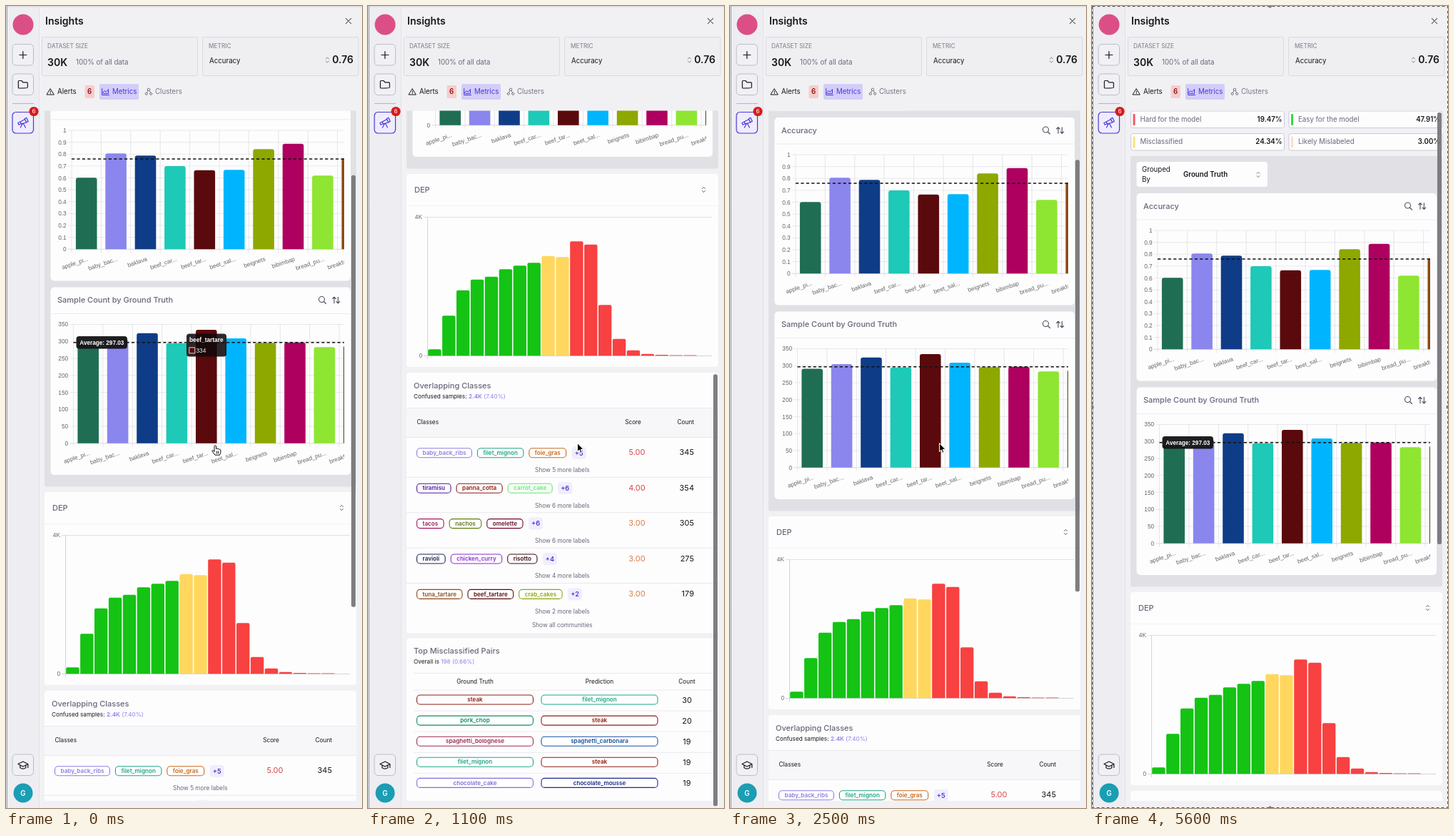
Animation, 499 px wide and 1122 px high, one loop 5.7 s. Source, as an HTML page with a canvas:

```html
<!DOCTYPE html>
<html lang="en">
<head>
<meta charset="utf-8">
<title>Insights</title>
<style>
html, body { margin: 0; width: 100%; height: 100%; overflow: hidden; background: #f1f1f4; }
canvas { display: block; width: 499px; height: 1122px; }
</style>
</head>
<body>
<canvas id="stage"></canvas>
<script>
const W = 499, H = 1122, LOOP = 5700, STEP = 100;
const canvas = document.getElementById('stage');
const c = canvas.getContext('2d');
const ratio = window.devicePixelRatio || 1;
canvas.width = W * ratio;
canvas.height = H * ratio;

const INTER = 'Inter, sans-serif';
const ARIAL = '"Liberation Sans", Arial, sans-serif';
const INK = '#17171c', MUTED = '#69677a', VIOLET = '#4b37d6', LILAC = '#8d80e6';

// ---------- helpers ----------
function text(s, x, y, size = 9.7, color = INK, weight = 400, align = 'left', family = INTER) {
  c.font = `${weight} ${size}px ${family}`;
  c.fillStyle = color;
  c.textAlign = align;
  c.fillText(s, x, y + size * 0.36);
}

function box(x, y, w, h, r, fill, stroke, lw = 1) {
  c.beginPath();
  c.roundRect(x, y, w, h, r);
  if (fill) { c.fillStyle = fill; c.fill(); }
  if (stroke) { c.strokeStyle = stroke; c.lineWidth = lw; c.stroke(); }
}

function disc(x, y, r, fill) {
  c.fillStyle = fill;
  c.beginPath();
  c.arc(x, y, r, 0, Math.PI * 2);
  c.fill();
}

function line(x1, y1, x2, y2, color, lw = 1) {
  c.strokeStyle = color;
  c.lineWidth = lw;
  c.beginPath();
  c.moveTo(x1, y1);
  c.lineTo(x2, y2);
  c.stroke();
}

function icon(d, x, y, color = INK, lw = 1.2, fill) {
  const p = new Path2D(d);
  c.save();
  c.translate(x, y);
  c.lineJoin = c.lineCap = 'round';
  if (fill) { c.fillStyle = fill; c.fill(p); }
  c.strokeStyle = color;
  c.lineWidth = lw;
  c.stroke(p);
  c.restore();
}

const ICONS = {
  plus: 'M-5 0H5M0-5V5',
  folder: 'M-6.5 4V-4.5Q-6.5-5.5-5.5-5.5H-2L0-3.2H5.5Q6.5-3.2 6.5-2.2V4Q6.5 5-5.5 5Q-6.5 5-6.5 4Z',
  scope: 'M-7 .5L-5.8 3.2L-2.6 1.8L-3.8-1ZM-3.8-1L2.6-4.6L4.8 0L-2.6 1.8M2.4-5.3L5-6.8L7.4-1.6L4.8-.3ZM-.5 1.5L-3.5 7M.5 1.3L3.5 7',
  cap: 'M-7-1.5L0-5L7-1.5L0 2ZM-4 .2V3.8Q0 6.4 4 3.8V.2M7-1.5V3.5',
  close: 'M-3.7-3.7L3.7 3.7M3.7-3.7L-3.7 3.7',
  updown: 'M-2-1.5L0-3.7L2-1.5M-2 1.5L0 3.7L2 1.5',
  alert: 'M0-4L5 4H-5ZM0-1V1.2M0 2.6V2.7',
  graph: 'M-4.8-4.5V4.5H5M-4.5 2L-1.5-1.5L.8.4L4-3.5V2.4H-3',
  cluster: 'M-1.8-3.2A1.8 1.8 0 1 0 1.8-3.2A1.8 1.8 0 1 0-1.8-3.2M-4.8 2.8A1.6 1.6 0 1 0-1.6 2.8A1.6 1.6 0 1 0-4.8 2.8M1.6 2.8A1.6 1.6 0 1 0 4.8 2.8A1.6 1.6 0 1 0 1.6 2.8M-1-1.6L-2.5 1.3M1-1.6L2.5 1.3',
  search: 'M-5-1A4 4 0 1 0 3-1A4 4 0 1 0-5-1M2 2L5 5',
  sort: 'M-2.7 4.3V-4.3M-5-2L-2.7-4.3L-.4-2M2.7-4.3V4.3M.4 2L2.7 4.3L5 2'
};

// ---------- data ----------
const DISHES = ['apple_pi...', 'baby_bac...', 'baklava', 'beef_car...', 'beef_tar...',
  'beet_sal...', 'beignets', 'bibimbap', 'bread_pu...', 'breakfas...'];
const FILLS = ['#1f6e53', '#8b86ee', '#0f3c87', '#1ec9b7', '#5a0a0c',
  '#00b5fd', '#8ea800', '#ae005f', '#8ee532'];
const ACCURACY = {
  title: 'Accuracy', top: 262, x0: 92, max: 1, tick: 0.1, avg: 0.76, last: '#8b4a10',
  values: [0.601, 0.806, 0.788, 0.699, 0.665, 0.668, 0.842, 0.888, 0.62, 0.765]
};
const COUNTS = {
  title: 'Sample Count by Ground Truth', top: 533.5, x0: 94.5, max: 350, tick: 50, avg: 297.03, last: '#47480c',
  values: [291, 305, 324, 295, 334, 309, 296, 297, 283, 288]
};
const DEP = [9, 56, 91.5, 106.5, 110.5, 121, 126, 130, 139.5, 138, 160, 155.5, 71, 23.5, 7.5, 2.5, 1.2, 0.8, 0.8];

const GROUPS = [
  ['5.00', 345, 5, 'baby_back_ribs #8b7fe0 filet_mignon #1fa585 foie_gras #c8691c'],
  ['4.00', 354, 6, 'tiramisu #4a1aa0 panna_cotta #8b1d14 carrot_cake #5ee66e'],
  ['3.00', 305, 6, 'tacos #a0185a nachos #5d7a10 omelette #6b0a2a'],
  ['3.00', 275, 4, 'ravioli #1c2350 chicken_curry #8a2bd0 risotto #3a0c10'],
  ['3.00', 179, 2, 'tuna_tartare #8a4a1c beef_tartare #5a0a0c crab_cakes #8ba512']
];
const PAIRS = [
  ['steak', '#8f1d12', 'filet_mignon', '#1fa585', 30],
  ['pork_chop', '#138a66', 'steak', '#8f1d12', 20],
  ['spaghetti_bolognese', '#9c2b4e', 'spaghetti_carbonara', '#164f9e', 19],
  ['filet_mignon', '#1fa585', 'steak', '#8f1d12', 19],
  ['chocolate_cake', '#7d72d8', 'chocolate_mousse', '#1b2a86', 19]
];

// ---------- motion ----------
const SCROLL = [[0, 140], [600, 367], [1100, 585], [1800, 585], [1900, 572], [2200, 364],
  [2500, 106], [2700, 25], [2900, 0], [LOOP, 0]];
const POINTER = [[0, 'hand'], [200, 'arrow'], [400, 'beam'], [800, 'arrow'], [2100, 'hand'],
  [2400, 'arrow'], [2900, 'grab'], [4300, '']];

function scrollAt(t) {
  const i = SCROLL.findIndex(k => k[0] > t);
  const [t0, a] = SCROLL[i - 1], [t1, b] = SCROLL[i];
  return a + (b - a) * (t - t0) / (t1 - t0);
}

// ---------- fixed parts ----------
function sidebar() {
  c.fillStyle = '#ededf2';
  c.fillRect(2, 2, 44, H);
  line(46.5, 2, 46.5, H, '#e2e2e8');
  c.fillStyle = '#dcdce0';
  c.fillRect(0, 0, W, 1.5);
  c.fillRect(0, 0, 1, H);
  line(1.5, 0, 1.5, H, '#a2a2a8');

  disc(24, 26, 14.5, '#dc4f86');
  const button = (y, name) => {
    box(9, y, 29.5, 29.5, 5, '#f1f1f5', '#bcbcca');
    icon(ICONS[name], 23.8, y + 15);
  };
  button(53.5, 'plus');
  button(95, 'folder');
  line(9, 136.5, 39, 136.5, '#b5b5c0');
  box(9, 148.5, 29.5, 29.5, 5, '#efedfd', VIOLET, 1.2);
  icon(ICONS.scope, 23.8, 163, VIOLET);
  disc(39, 147.5, 6.6, '#d61b1b');
  text('6', 39, 147.5, 8, '#fff', 400, 'center');
  button(1047, 'cap');
  disc(24, 1101, 13.5, '#1b9db3');
  text('G', 24, 1101.5, 9.7, '#fff', 600, 'center');
}

function header() {
  text('Insights', 55, 21, 14, INK, 600);
  icon(ICONS.close, 480, 21, '#55555f', 1.1);
  box(50.5, 43.5, 218, 54, 2, '#efeff2', '#d9d9e0');
  box(275.5, 43.5, 218.5, 54, 2, '#efeff2', '#d9d9e0');
  text('DATASET SIZE', 58, 56.5, 8.25, '#8b8a98', 500);
  text('METRIC', 284, 56.5, 8.25, '#8b8a98', 500);
  text('30K', 58, 79, 14, INK, 600);
  text('100% of all data', 98, 79, 9.7, MUTED);
  text('Accuracy', 285, 76.5, 9.7);
  icon(ICONS.updown, 450.5, 75.5, '#777', 0.9);
  text('0.76', 487, 75, 14, INK, 600, 'right');

  icon(ICONS.alert, 62.3, 120, INK, 1);
  text('Alerts', 72, 120);
  box(110.5, 111, 13.5, 18, 2, '#f8cccc');
  text('6', 117.2, 120, 9.7, '#8a1414', 600, 'center');
  box(131, 109, 55, 22, 2, '#d2cdf9');
  icon(ICONS.graph, 139.5, 120, VIOLET, 1);
  text('Metrics', 149, 120, 9.7, VIOLET);
  icon(ICONS.cluster, 200, 120, '#777683', 1);
  text('Clusters', 209, 120, 9.7, '#777683');
}

// ---------- scrolled parts ----------
function summary(x, y, label, value, color) {
  box(x, y, 215, 23.5, 3, '#fdfdfe', '#cbc9dc');
  box(x + 3, y + 4, 3, 16, 1, color);
  text(label, x + 13, y + 11.5, 9.7, MUTED);
  text(value, x + 212, y + 11.5, 9.7, INK, 600, 'right');
}

function barChart({ title, top, x0, max, tick, avg, last, values }) {
  const base = top + 218.3, span = 166.3, pitch = 41.4, barW = 29.6, right = 474;
  const yOf = v => base - v / max * span;
  box(62.5, top, 420.5, 262.5, 5, '#fdfdfe');
  text(title, 72, top + 18, 11, MUTED, 500);
  icon(ICONS.search, 443.5, top + 18, '#4d4b5a', 1.1);
  icon(ICONS.sort, 462.7, top + 18, '#4d4b5a', 1.1);
  line(62.5, top + 37, 483, top + 37, '#ebebef');

  const ticks = Math.round(max / tick);
  for (let i = 0; i <= ticks; i++) {
    const y = yOf(i * tick);
    line(x0 - 5, y, right, y, i ? '#e4e4e7' : '#cfcfd4', 0.8);
    text(String(+(i * tick).toFixed(1)), x0 - 7.3, y, 8.3, '#666', 400, 'right', ARIAL);
  }
  c.save();
  c.beginPath();
  c.rect(62, top, right - 62, 262);
  c.clip();
  values.forEach((v, i) => {
    const x = x0 + i * pitch, y = yOf(v);
    line(x, base - span, x, base + 5, '#e0e0e4', 0.8);
    box(x + (pitch - barW) / 2, y, barW, base - y, [3, 3, 0, 0], FILLS[i] || last);
    c.save();
    c.translate(x + pitch / 2 + 2, base + 13);
    c.rotate(-19 * Math.PI / 180);
    text(DISHES[i], 0, 0, 8.3, '#666', 400, 'right', ARIAL);
    c.restore();
  });
  c.setLineDash([4.2, 3.2]);
  line(x0, yOf(avg), right, yOf(avg), '#111', 1.5);
  c.restore();
}

function depCard() {
  box(54, 820, 437, 270, 4, '#fdfdfe');
  text('DEP', 65, 842.5, 11, MUTED, 500);
  icon(ICONS.updown, 470.5, 842, '#555', 0.9);
  line(54, 864.5, 491, 864.5, '#f2f2f5');
  text('4K', 76, 880, 8.3, '#666', 400, 'right', ARIAL);
  text('0', 76, 1074.3, 8.3, '#666', 400, 'right', ARIAL);
  line(78, 880.5, 482, 880.5, '#e0e0e4');
  line(78, 1074.5, 482, 1074.5, '#d4d4d8');
  line(83.5, 880, 83.5, 1079, '#d4d4d8');
  DEP.forEach((h, i) => {
    const color = i < 8 ? '#14c314' : i < 10 ? '#ffd75e' : '#f84141';
    box(84.2 + i * 19.9, 1074.3 - h, 18.4, h, [Math.min(2, h), Math.min(2, h), 0, 0], color);
  });
}

function tag(label, color, x, y, w) {
  c.font = `600 8.1px ${INTER}`;
  w = w || c.measureText(label).width + 16;
  box(x, y - 6.5, w, 13, 4.5, '#fff', color, 1.1);
  text(label, x + w / 2, y - 0.3, 8.1, color, 600, 'center');
  return w;
}

function cardTitle(title, y, lead, value, share, bold) {
  text(title, 64, y, 11, MUTED, 500);
  let x = 64;
  [[lead, INK, 400], [value, LILAC, bold], [share, LILAC, 400]].forEach(([s, color, weight]) => {
    text(s, x, y + 14.7, 8.2, color, weight);
    x += c.measureText(s).width + 2.4;
  });
}

function overlapCard() {
  box(54, 1098, 437, 364.5, 4, '#fdfdfe');
  cardTitle('Overlapping Classes', 1116, 'Confused samples:', '2.4K', '(7.40%)', 600);
  c.fillStyle = '#f7f7f9';
  c.fillRect(54, 1147, 437, 41);
  line(54, 1147.5, 491, 1147.5, '#e9e9ee');
  line(54, 1188.5, 491, 1188.5, '#e9e9ee');
  text('Classes', 68.5, 1167.3, 8.25);
  text('Score', 371.5, 1167.3, 8.25, INK, 400, 'center');
  text('Count', 457, 1167.3, 8.25, INK, 400, 'right');
  GROUPS.forEach(([score, count, more, tags], i) => {
    const y = 1210.3 + i * 49.4, parts = tags.split(' ');
    let x = 68.5;
    for (let k = 0; k < parts.length; k += 2) x += tag(parts[k], parts[k + 1], x, y, 0) + 8;
    box(x, y - 8.5, 20, 17, 4, '#f0eefc');
    text('+' + more, x + 10, y, 9.2, VIOLET, 600, 'center');
    text(score, 377, y - 0.8, 11, i < 2 ? '#d8434a' : '#dd7a42', 400, 'center');
    text(count, 457, y - 0.8, 11, INK, 400, 'right');
    text(`Show ${more} more labels`, 272.3, y + 24, 8.25, MUTED, 400, 'center');
    if (i < 4) line(54, y + 34, 491, y + 34, '#e9e9ee');
  });
  text('Show all communities', 272.3, 1451.5, 8.25, MUTED, 400, 'center');
}

function pairsCard() {
  box(54, 1469.5, 437, 228, 4, '#fdfdfe');
  cardTitle('Top Misclassified Pairs', 1487, 'Overall is', '198', '(0.66%)', 400);
  line(64, 1518.5, 484, 1518.5, '#e9e9ee');
  text('Ground Truth', 150, 1530, 8.25, INK, 400, 'center');
  text('Prediction', 324.5, 1530, 8.25, INK, 400, 'center');
  text('Count', 447, 1530, 8.25, INK, 400, 'center');
  PAIRS.forEach(([truth, color, guess, color2, n], i) => {
    const y = 1555.5 + i * 29.1;
    line(64, y - 13.5, 484, y - 13.5, '#ececf0');
    tag(truth, color, 68.5, y, 163);
    tag(guess, color2, 243, y, 163);
    text(n, 447, y + 0.5, 11, INK, 400, 'center');
  });
}

function tooltips(t) {
  if (t < 100 || t >= 2900) {
    box(98.5, 602, 71.5, 17.5, 4, 'rgba(22,22,24,.96)');
    text('Average: 297.03', 134.3, 610.6, 8.2, '#fff', 700, 'center', ARIAL);
  }
  if (t < 100) {
    box(253, 598.5, 56, 32, 4, 'rgba(18,10,12,.88)');
    text('beef_tartare', 257, 607.5, 8.3, '#fff', 700, 'left', ARIAL);
    box(256.8, 617.8, 8, 8, 0, '#5a0a0c', '#eee', 0.9);
    text('334', 266.5, 621.8, 8.3, '#eee', 400, 'left', ARIAL);
  }
}

function content(t, s) {
  c.save();
  c.beginPath();
  c.rect(50, 146.5, 442, 965.5);
  c.clip();
  c.translate(0, -s);
  summary(54.5, 147, 'Hard for the model', '19.47%', '#f25a63');
  summary(276, 147, 'Easy for the model', '47.91%', '#3bd942');
  summary(54.5, 178.5, 'Misclassified', '24.34%', '#fae37c');
  summary(276, 178.5, 'Likely Mislabeled', '3.00%', '#fbe0c8');
  box(54, 210, 437, 602.5, 3, '#e1e1e5');
  box(62.5, 218, 183.5, 35, 4, '#fdfdfe');
  text('Grouped', 70, 228.5);
  text('By', 70, 243);
  text('Ground Truth', 128, 236, 9.7, INK, 600);
  icon(ICONS.updown, 233, 236, '#777', 0.9);
  barChart(ACCURACY);
  barChart(COUNTS);
  depCard();
  overlapCard();
  pairsCard();
  tooltips(t);
  c.restore();
  box(484, 149 + s * 0.626, 6, 604, 2.5, 'rgba(118,118,122,.93)');
}

// ---------- overlays ----------
function pointer(t) {
  const kind = POINTER.filter(k => k[0] <= t).pop()[1];
  if (kind === 'arrow') {
    icon('M0 0V11.5L2.7 9L4.6 13.2L6.5 12.3L4.7 8.3H8.2Z', 293.5, 612, '#fff', 1, '#000');
  } else if (kind === 'beam') {
    const d = 'M-2.5-6.5Q0-6.5 0-5Q0-6.5 2.5-6.5M0-5V5M-2.5 6.5Q0 6.5 0 5Q0 6.5 2.5 6.5M-1.5 1H1.5';
    icon(d, 294.5, 614, '#fff', 3);
    icon(d, 294.5, 614, '#111', 1.2);
  } else if (kind === 'hand') {
    icon('M-2.5 2V-5.5Q-1.3-7.4 0-5.5V-1.5Q1.5-2.6 2.4-1.2Q3.9-2 4.6-.6Q6.2-1 6.4.8V3.5L5 7.2H-1.5L-5.6 1.6Q-5.5-.6-2.5 2ZM.8 2V5M3 2V5', 294.5, 621, '#111', 1, '#fff');
  } else if (kind === 'grab') {
    icon('M-3.2 2L-4.8-3.4Q-4.1-5-3-3.8L-1.7-.8L-2-5.2Q-.9-6.8.1-5.2L.4-1L1.5-5.2Q2.8-6.4 3.3-4.8L2.8-.4L4.5-3Q5.8-3.4 5.7-2L4.4 3.8L3.3 6.5H-2L-6 1.6Q-5.5-.4-3.2 2Z', 293, 613, '#111', 1, '#fff');
  }
}

function selection() {
  c.save();
  c.strokeStyle = '#fff';
  c.lineWidth = 1;
  c.strokeRect(0.5, 0.5, W - 1, H - 1);
  c.setLineDash([4, 3]);
  c.strokeStyle = '#55555a';
  c.strokeRect(0.5, 0.5, W - 1, H - 1);
  c.restore();
  [[0, 561], [W, 561], [249.5, 0], [249.5, H]].forEach(([x, y]) => disc(x, y, 2.5, '#77777c'));
}

function draw(now) {
  const t = Math.floor(now % LOOP / STEP) * STEP;
  c.setTransform(ratio, 0, 0, ratio, 0, 0);
  c.fillStyle = '#f1f1f4';
  c.fillRect(0, 0, W, H);
  sidebar();
  header();
  content(t, scrollAt(t));
  pointer(t);
  if (t >= 3800) selection();
}

const start = performance.now();
function tick() {
  draw(performance.now() - start);
  requestAnimationFrame(tick);
}
tick();
</script>
</body>
</html>
```
